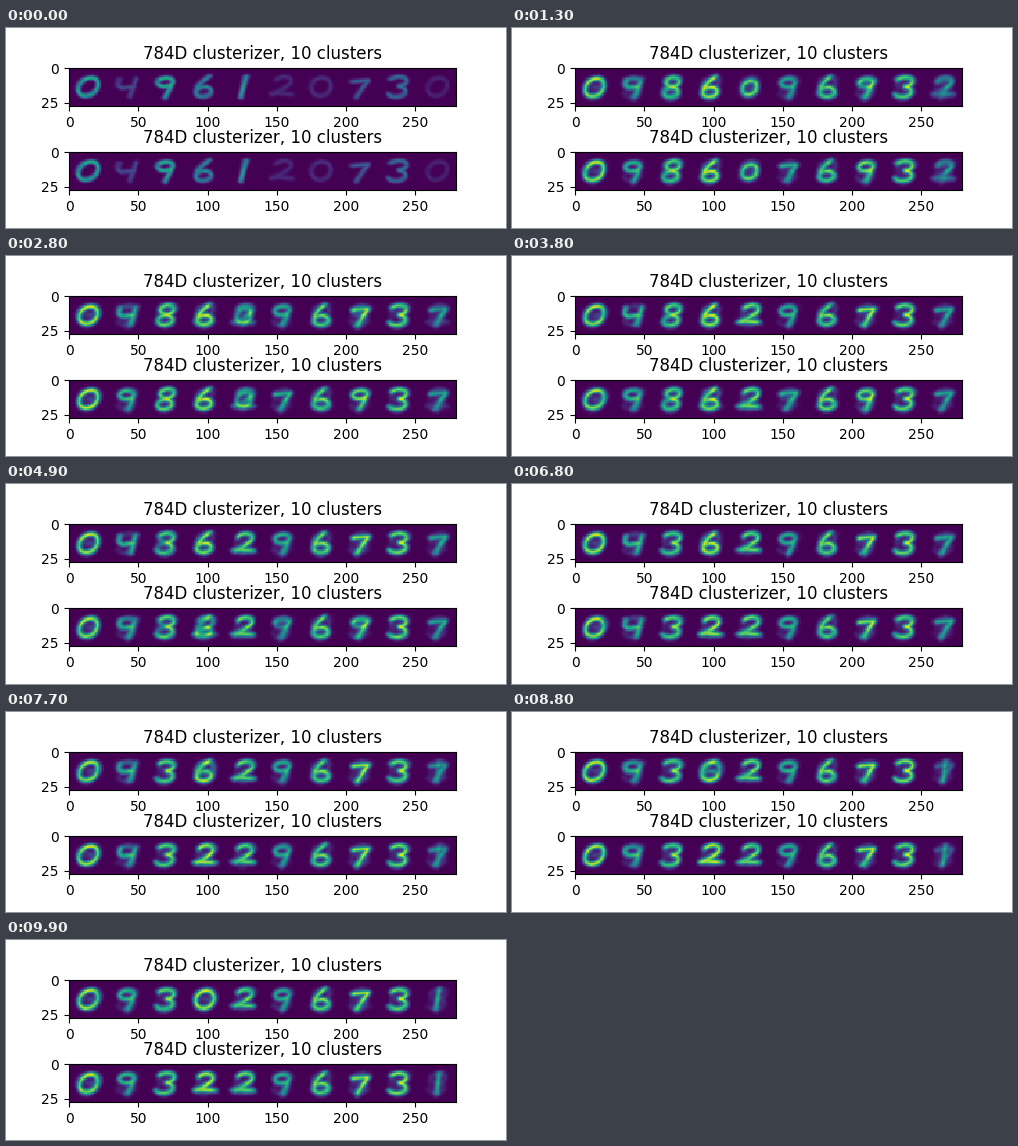
Animation, 500 px wide and 200 px high, one loop 10 s. Source, as a matplotlib script:

```python
from functools import lru_cache

import matplotlib.pyplot as plt
import numpy as np
from matplotlib.animation import FuncAnimation

SIZE, FRAMES, COPIES = 28, 100, 14
WIDTH, HEIGHT = 1.28, 0.93


def arc(cx, cy, rx, ry, start=0, stop=360):
    a = np.radians(np.linspace(start, stop, 36))
    return np.column_stack([cx + rx * np.cos(a), cy + ry * np.sin(a)])


def line(*pts):
    x, y = np.array(pts, float).T
    s = np.linspace(0, len(pts) - 1, 16 * (len(pts) - 1))
    k = np.arange(len(pts))
    return np.column_stack([np.interp(s, k, x), np.interp(s, k, y)])


# Pen strokes around the tile centre; "o" is a small squat zero
STROKES = {
    "0": [arc(0, 0, 5.4, 7.2)],
    "o": [arc(0, 0.5, 4.2, 5.6)],
    "1": [line((0, -8), (0, 8))],
    "2": [arc(0, -4, 4.4, 4, -160, 40),
          line((3.4, -1.5), (0, 2.5), (-5.5, 6), (-2, 5), (6.5, 6))],
    "3": [arc(-0.7, -4.3, 4.8, 3.7, -150, 80), arc(-0.7, 3.9, 5, 4.1, -80, 150)],
    "4": [line((-5, -6), (-5.3, -1), (-3, 1.2), (4, 0)),
          line((4.4, -6.5), (3.6, 0), (2.3, 8))],
    "5": [line((5, -7.5), (-2.5, -7), (-3.7, -2)), arc(-1, 3, 5, 4.8, -115, 145)],
    "6": [line((1.5, -8.5), (-2, -4), (-4, 0), (-4.2, 4)), arc(0, 4, 4.3, 3.8)],
    "7": [line((-5, -4), (-1, -4.5), (4, -5), (2, 0), (-0.5, 8.5))],
    "8": [arc(0, -4.6, 3.9, 3.7), arc(-0.2, 4.2, 4.2, 3.9)],
    "9": [arc(-0.8, -3.6, 4.2, 3.5), line((3.4, -4), (2.8, 0), (0.8, 8.5))],
}

# Per cluster: seed digit, upper and lower history, slant, first and final peak
CLUSTERS = [
    ("0", "0", "0", 0.25, 0.62, 0.88),
    ("4", "9449", "9949", 0.1, 0.22, 0.70),
    ("9", "8833", "8833", 0.15, 0.60, 0.85),
    ("6", "6660", "6622", 0.15, 0.45, 0.90),
    ("1", "oo2222", "oo2222", 0.2, 0.52, 0.80),
    ("2", "9", "7799", 0.15, 0.12, 0.65),
    ("0", "6", "6", 0.05, 0.13, 0.80),
    ("7", "9777", "9977", 0.2, 0.30, 0.88),
    ("3", "3", "3", 0.1, 0.35, 0.90),
    ("0", "2771", "2771", 0.15, 0.10, 0.60),
]

rng = np.random.default_rng(7)
spread = rng.normal(size=(COPIES, 5)) * [0.1, 0.09, 0.15, 0.8, 0.7]
spread[0] = 0
gy, gx = np.mgrid[:SIZE, :SIZE] - 14


@lru_cache(maxsize=None)
def samples(glyph, slant):
    """Slightly different handwritten copies of one digit."""
    x, y = np.vstack(STROKES[glyph]).T
    out = []
    for sx, sy, lean, dx, dy in spread:
        px = x * WIDTH * (1 + sx) - (slant + lean) * y + dx
        py = y * HEIGHT * (1 + sy) + dy
        d2 = (gx[..., None] - px) ** 2 + (gy[..., None] - py) ** 2
        out.append(np.exp(-d2.min(axis=-1) / 2.3))
    return np.array(out)


POOL = np.concatenate([samples(d, 0.15) for d in "0123456789"])
rates = rng.uniform(0.1, 0.5, (2, len(CLUSTERS), len(POOL)))
phases = rng.uniform(0, 2 * np.pi, (len(CLUSTERS), len(POOL)))


def blend(history, slant, t):
    """Copies of the digits the cluster is passing between at time t."""
    pos = t * (len(history) - 1)
    k = int(pos)
    a, b = history[k], history[min(k + 1, len(history) - 1)]
    mix = pos - k
    return (1 - mix) * samples(a, slant) + mix * samples(b, slant)


def tile(row, slot, frame):
    seed, *histories, slant, first, final = CLUSTERS[slot]
    learned = 1 - np.exp(-frame / 4)
    drift = 1 + np.sin(rates[row, slot] * frame + phases[slot])

    copies = blend(histories[row], slant, frame / (FRAMES - 1))
    mean = np.average(copies, axis=0, weights=0.2 + drift[:COPIES])
    stray = np.average(POOL, axis=0, weights=drift ** 4)
    mean = mean / mean.max() + 0.25 * stray / stray.max()
    start = samples(seed, slant)[:4].mean(axis=0)
    return (learned * final * mean / mean.max()
            + (1 - learned) * first * start / start.max())


def strip(row, frame):
    return np.hstack([tile(row, s, frame) for s in range(len(CLUSTERS))])


fig, axes = plt.subplots(2, 1, figsize=(5, 2), dpi=100)
images = []
for row, ax in enumerate(axes):
    images.append(ax.imshow(strip(row, 0), cmap="viridis", vmin=0, vmax=0.95,
                            interpolation="nearest"))
    ax.set_title("784D clusterizer, 10 clusters")


def update(frame):
    for row, image in enumerate(images):
        image.set_data(strip(row, frame))
    return images


anim = FuncAnimation(fig, update, frames=FRAMES, interval=100, repeat=True)
plt.show()
```
